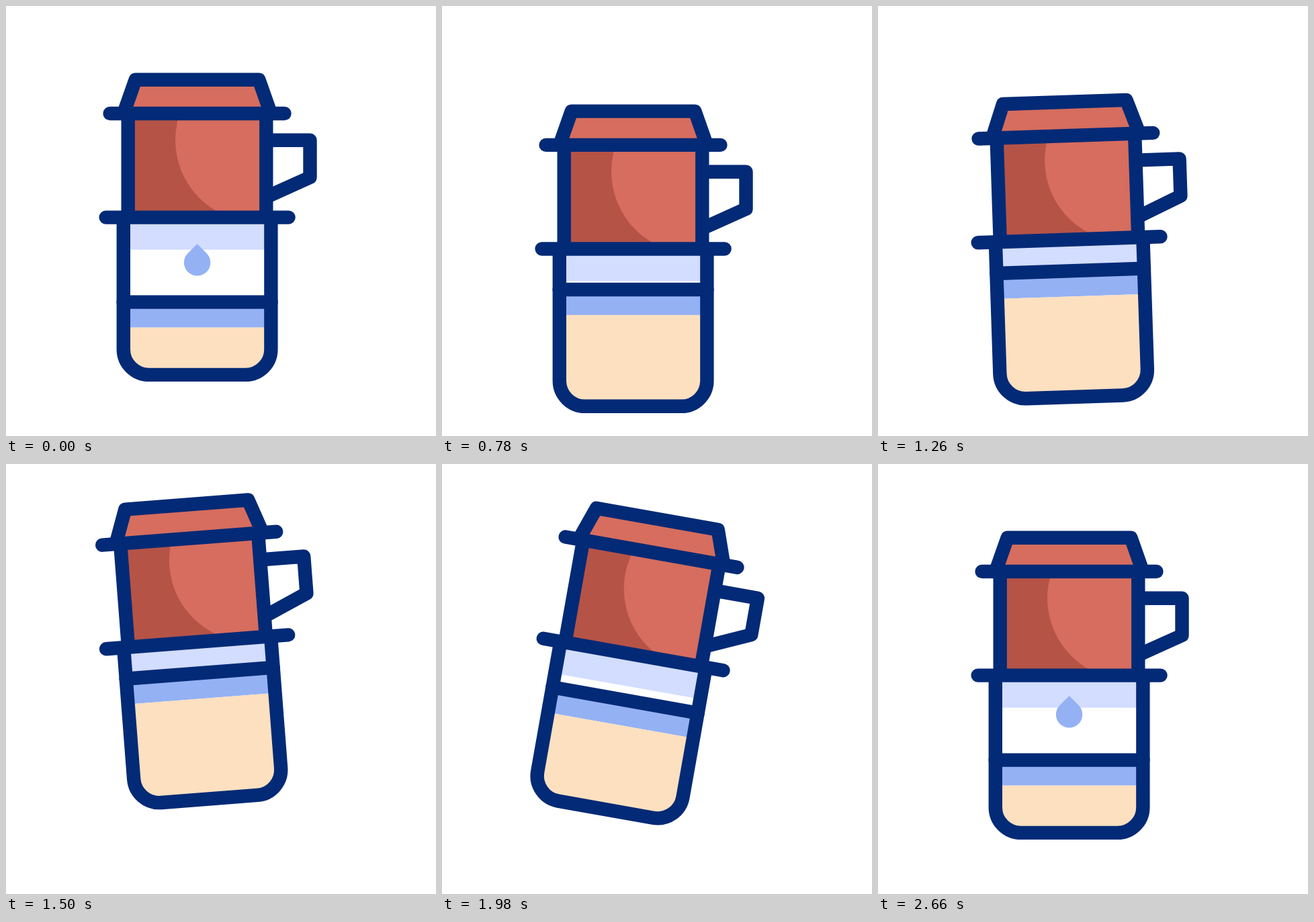
Recreate the animation shown at these times as an HTML page with a canvas. Size 640 by 640 pixels, loop 2.68 s.

```html
<!DOCTYPE html>
<html lang="en">
<head>
<meta charset="utf-8">
<title>Coffee dripper</title>
<style>
html, body { margin: 0; width: 100%; height: 100%; overflow: hidden; background: #fff; }
canvas { display: block; width: 640px; height: 640px; }
</style>
</head>
<body>
<canvas id="stage" width="640" height="640"></canvas>
<script>
const ctx = document.getElementById('stage').getContext('2d');
const LOOP = 2680;
const NAVY = '#032a76', RED = '#d66d5e', DARK_RED = '#b55347';
const PALE = '#d2ddff', BLUE = '#94b1f4', CREAM = '#fde0bf';
const PIVOT = { x: 284.6, y: 314.6 };

// Keyframes as [time, value], eased between neighbours
const LIFT = [[0, 0], [1117, 60], [1584, -60], [1685, -60], [2290, 0]];
const TILT = [[1060, 0], [1500, -4.4], [1889, 11], [2391, 0]];
const LEVEL = [[0, 440.6], [1062, 361.2], [1750, 361.2], [2405, 440.6]];
const DROPS = [0, 399];   // times at which a drop tip passes y = 354
const DROP_SPEED = 0.45;  // px per ms

function valueAt(keys, t) {
  if (t <= keys[0][0]) return keys[0][1];
  for (let i = 1; i < keys.length; i++) {
    const [t0, a] = keys[i - 1], [t1, b] = keys[i];
    if (t < t1) {
      const s = (t - t0) / (t1 - t0);
      return a + (b - a) * s * s * (3 - 2 * s);
    }
  }
  return keys[keys.length - 1][1];
}

function rect(color, x0, y0, x1, y1) {
  ctx.fillStyle = color;
  ctx.fillRect(x0, y0, x1 - x0, y1 - y0);
}

function trace(points) {
  ctx.beginPath();
  points.forEach(([x, y]) => ctx.lineTo(x, y));
}

function line(...points) {
  trace(points);
  ctx.stroke();
}

function clipped(makePath, draw) {
  ctx.save();
  ctx.beginPath();
  makePath();
  ctx.clip();
  draw();
  ctx.restore();
}

function glassPath() {
  ctx.beginPath();
  ctx.moveTo(174.8, 314.6);
  ctx.arcTo(174.8, 548.9, 284.6, 548.9, 38);
  ctx.arcTo(394.4, 548.9, 394.4, 314.6, 38);
  ctx.lineTo(394.4, 314.6);
}

function drawDrop(tip) {
  const r = 19.7;
  ctx.fillStyle = BLUE;
  ctx.beginPath();
  ctx.moveTo(284.6, tip);
  ctx.arc(284.6, tip + r * Math.SQRT2, r, -Math.PI / 4, Math.PI * 1.25);
  ctx.fill();
}

function drawGlass(t) {
  const level = valueAt(LEVEL, t);
  clipped(glassPath, () => {
    rect(PALE, 174, 314, 395, 362.7);
    clipped(() => ctx.rect(174, 314, 221, level - 314), () => {
      for (const start of DROPS) {
        let dt = t - start;
        if (dt > LOOP / 2) dt -= LOOP;
        const tip = 354 + DROP_SPEED * dt;
        if (tip > 260 && tip < 450) drawDrop(tip);
      }
    });
    rect(BLUE, 174, level, 395, level + 38);
    rect(CREAM, 174, level + 38, 395, 550);
  });
  line([174.6, level], [394.6, level]);
  glassPath();
  ctx.stroke();
}

function drawFilter() {
  const lid = [[175, 160], [192.7, 109.7], [376.4, 109.7], [394.1, 160]];
  line([387.3, 199.8], [452.5, 199.8], [452.5, 255], [387.3, 284.4]);
  ctx.fillStyle = RED;
  trace(lid);
  ctx.fill();
  rect(DARK_RED, 181.7, 160, 387.3, 314.6);
  clipped(() => ctx.rect(181.7, 160, 205.6, 154.6), () => {
    ctx.fillStyle = RED;
    ctx.beginPath();
    ctx.arc(374, 199.5, 122, 0, Math.PI * 2);
    ctx.fill();
    ctx.fillRect(374, 160, 14, 155);
  });
  line(...lid);
  line([181.7, 160], [181.7, 314.6]);
  line([387.3, 160], [387.3, 314.6]);
  line([154.6, 160], [414.5, 160]);
  line([148.6, 314.6], [420.6, 314.6]);
}

function render(t) {
  ctx.setTransform(1, 0, 0, 1, 0, 0);
  rect('#fff', 0, 0, 640, 640);
  ctx.translate(PIVOT.x, PIVOT.y + valueAt(LIFT, t));
  ctx.rotate(valueAt(TILT, t) * Math.PI / 180);
  ctx.translate(-PIVOT.x, -PIVOT.y);
  ctx.strokeStyle = NAVY;
  ctx.lineWidth = 20.4;
  ctx.lineCap = ctx.lineJoin = 'round';
  drawGlass(t);
  drawFilter();
}

let origin;
function tick(now) {
  origin ??= now;
  render((now - origin) % LOOP);
  requestAnimationFrame(tick);
}
render(0);
requestAnimationFrame(tick);
</script>
</body>
</html>
```
